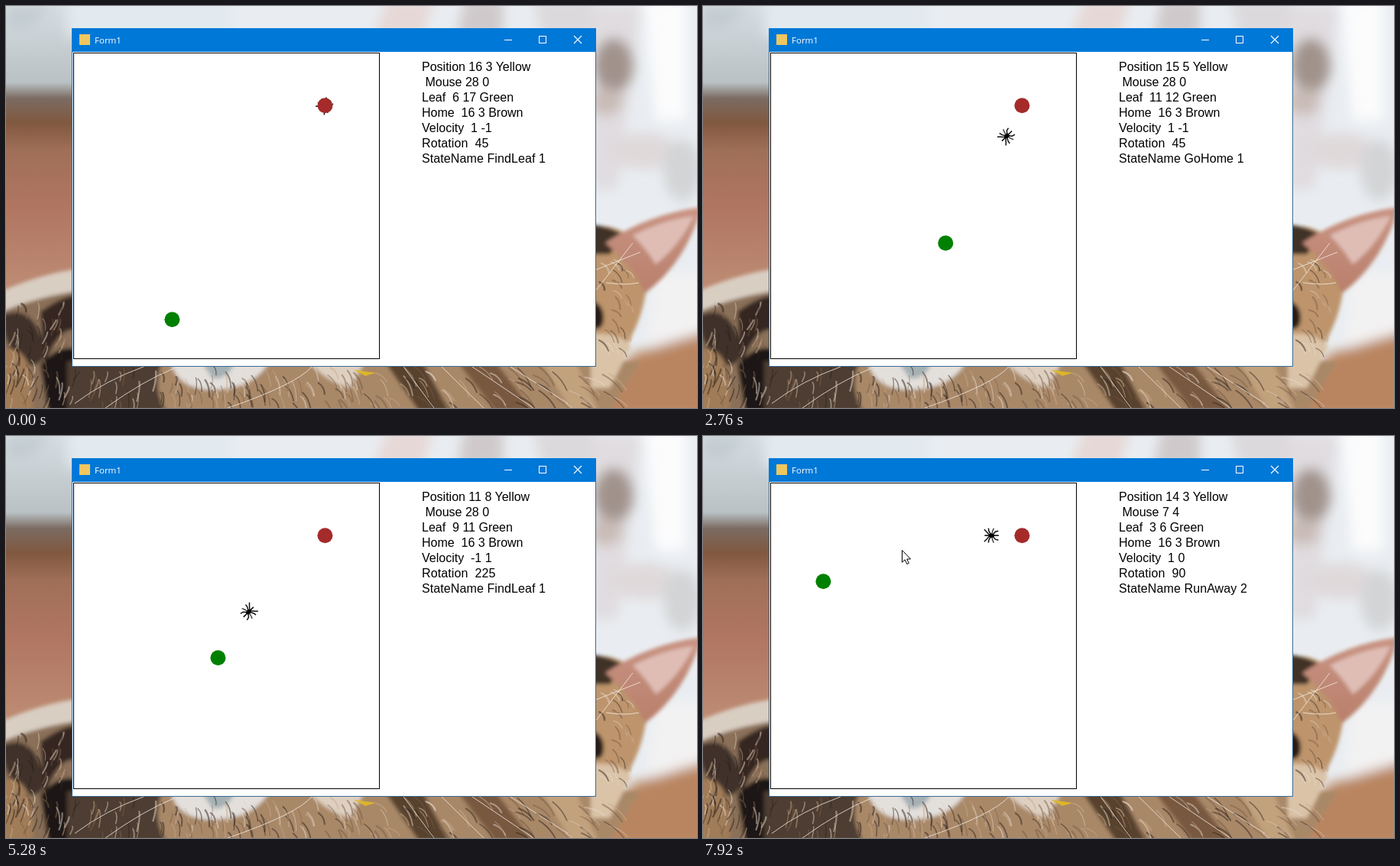
An HTML page for the animation above (8000 ms loop, 904 by 526 pixels).

```html
<!DOCTYPE html>
<html lang="en">
<head>
<meta charset="utf-8">
<title>Ant state machine</title>
<style>
html, body { margin: 0; width: 100%; height: 100%; overflow: hidden; }
svg { display: block; }
text { white-space: pre; }
#info { font: 16px "Liberation Sans", Arial, sans-serif; fill: #000; }
</style>
</head>
<body>
<svg width="904" height="526" viewBox="0 0 904 526">
  <defs>
    <filter id="soft" x="-30%" y="-30%" width="160%" height="160%"><feGaussianBlur stdDeviation="8"/></filter>
    <filter id="fine" x="-20%" y="-20%" width="140%" height="140%"><feGaussianBlur stdDeviation="2.5"/></filter>
    <linearGradient id="wall" x2="0" y2="1">
      <stop offset="0" stop-color="#d5dde1"/><stop offset=".19" stop-color="#b9c1c4"/>
      <stop offset=".23" stop-color="#7b6b62"/><stop offset=".29" stop-color="#80583f"/>
      <stop offset=".36" stop-color="#a06f58"/><stop offset=".5" stop-color="#b07661"/>
      <stop offset=".7" stop-color="#bd8b73"/>
    </linearGradient>
    <linearGradient id="ear" x2="0" y2="1">
      <stop offset="0" stop-color="#c99483"/><stop offset="1" stop-color="#b97f6b"/>
    </linearGradient>
  </defs>

  <g id="photo">
    <rect width="904" height="526" fill="#e9edf1"/>
    <rect width="100" height="526" fill="url(#wall)"/>
    <g filter="url(#soft)">
      <path d="M0 0H60L30 30H0Z" fill="#c3ccd0"/>
      <path d="M80 -10H300V40H80Z" fill="#e3eaef"/>
      <path d="M500 -10H560L545 40H480Z" fill="#e6d8d6"/>
      <path d="M600 -10H650V40H590Z" fill="#cfc9cb"/>
      <path d="M690 -10H770V40H700Z" fill="#dcd9dc"/>
      <path d="M765 0H830L800 240H765Z" fill="#e0dcdf"/>
      <path d="M835 -10H890V150H850Z" fill="#fcfcfd"/>
      <ellipse cx="795" cy="78" rx="26" ry="36" fill="#a1938c"/>
      <ellipse cx="785" cy="125" rx="22" ry="18" fill="#c9bcb7"/>
      <ellipse cx="835" cy="190" rx="45" ry="24" fill="#dfd9da"/>
      <ellipse cx="885" cy="215" rx="25" ry="40" fill="#d3d4d6"/>
      <path d="M850 350H920V445H840Z" fill="#f3f2f2"/>
      <path d="M820 455L920 425V540H740Z" fill="#b98560"/>
    </g>
    <g filter="url(#fine)">
      <path d="M-10 380Q45 350 100 345V540H-10Z" fill="#8a7058"/>
      <path d="M-10 375Q45 350 100 343V372Q40 380 -10 402Z" fill="#d9cec2"/>
      <path d="M-5 405Q30 390 45 430T30 470Q-5 450 -5 405Z" fill="#40332b"/>
      <path d="M45 400Q80 375 95 380V425Q70 415 50 470Z" fill="#342821"/>
      <path d="M-5 450Q40 440 35 530H-5Z" fill="#a07b59"/>
      <path d="M45 470Q70 440 95 450V530H55Z" fill="#1e1815"/>
      <path d="M80 465H830L790 530H80Z" fill="#a98868"/>
      <path d="M80 465H205Q190 500 210 530H80Z" fill="#4e3e33"/>
      <path d="M215 465H345Q325 500 275 502T215 465Z" fill="#e3dfdb"/>
      <path d="M255 465H300Q290 490 270 487Z" fill="#a5b0b4"/>
      <path d="M395 465H470L450 500Q420 492 395 465Z" fill="#ded0c1"/>
      <path d="M495 465H545L580 530H540Z" fill="#59422f"/>
      <path d="M590 465H640L690 530H640Z" fill="#79593f"/>
      <path d="M700 465H745L775 530H740Z" fill="#c2a17d"/>
      <path d="M765 290Q800 280 840 320Q842 380 824 420T790 485H765Z" fill="#bd946c"/>
      <path d="M765 286Q790 288 808 300L790 325H765Z" fill="#413128"/>
      <path d="M765 430Q800 425 818 445L790 500H765Z" fill="#dac3a7"/>
      <path d="M765 385Q782 390 782 408T765 422Z" fill="#291e18"/>
      <path d="M784 310Q840 272 910 263Q890 335 836 376Q820 340 784 310Z" fill="url(#ear)"/>
      <path d="M820 300Q865 278 900 275Q880 315 850 338Q838 318 820 300Z" fill="#dfbdb5"/>
    </g>
    <g id="fur" fill="none" stroke-linecap="round"></g>
    <g fill="none" stroke="#f4ece2" stroke-width="1" opacity=".8">
      <path d="M772 372L820 310M772 345L830 322M785 362Q810 366 828 362"/>
      <path d="M90 520Q130 490 180 472M130 526Q180 490 220 474M290 526Q380 495 400 472"/>
      <path d="M520 472L560 526M570 472L625 526M610 472L690 526M660 472L735 520"/>
    </g>
    <path d="M455 476L484 480L470 484Z" fill="#dcb52b"/>
  </g>

  <rect x="86" y="29" width="686" height="443" fill="#3b6b94"/>
  <rect x="87" y="60" width="684" height="411" fill="#fff"/>
  <rect x="86" y="29" width="686" height="31" fill="#0078d7"/>
  <rect x="96" y="37" width="14" height="14" fill="#efc75e"/>
  <text x="116" y="49" font-family="'Open Sans', sans-serif" font-size="11.5" fill="#fff">Form1</text>
  <g fill="none" stroke="#fff">
    <path d="M652 44.5H662"/>
    <rect x="697.5" y="39.5" width="9" height="9"/>
    <path d="M743 39L753 49M753 39L743 49" stroke-width="1.1"/>
  </g>
  <rect x="88.5" y="61.5" width="400" height="400" fill="#fff" stroke="#000"/>

  <g id="ant" fill="none" stroke="#111" stroke-width="1.5">
    <path d="M0 -9.5V9" stroke-width="1.6"/>
    <path d="M-6 -9L-5 -5L0 -1L5 -5L6 -9"/>
    <path d="M-9.5 -3L-6 -1.5L0 0L6 -1.5L9.5 -3" stroke="#444"/>
    <path d="M-9.5 4L-6 3.5L0 0L6 3.5L9.5 4"/>
    <path d="M-8 9.5L-5 6.5L0 2L5 6.5L8 9.5"/>
    <ellipse rx="2.7" ry="3.6" fill="#000" stroke="none"/>
  </g>
  <circle id="leaf" r="10" fill="#008000"/>
  <circle id="home" r="10" fill="#a52a2a"/>
  <g id="info"></g>
  <path id="cursor" d="M.5 .5V16.3L4.2 12.9L6.8 18.6L9.3 17.5L6.8 12H11.6Z" fill="#fff" stroke="#000"/>
</svg>
<script>
const $ = id => document.getElementById(id);
const NS = 'http://www.w3.org/2000/svg';
const LOOP = 8000, FRAME = 120;
const TICKS_PER_FRAME = 1.145, PHASE = 0.65;
const HOME = [16, 3];
const LEAVES = [[6, 17], [11, 12], [9, 11], [3, 6]];
const FLEE_TICK = 70;
const CURSOR_START = 55, MOUSE_LAG = 0.75;
const TRAIL = [
  [390, 286], [314, 257], [240, 204], [221, 172], [212, 153], [208, 141],
  [206, 135], [205, 131], [204, 129], [216, 133], [242, 143], [260, 149]
];

function add(parent, tag, attrs) {
  const el = document.createElementNS(NS, tag);
  for (const key in attrs) el.setAttribute(key, attrs[key]);
  return parent.appendChild(el);
}

function place(el, [x, y], turn = 0) {
  el.setAttribute('transform', `translate(${x} ${y}) rotate(${turn})`);
}

const centre = ([x, y]) => [97.4 + 20 * x, 70.2 + 20 * y];

function drawFur() {
  let seed = 11;
  const rnd = () => (seed = seed * 16807 % 2147483647) / 2147483647;
  const tones = ['#2b211c', '#c9a98a', '#e4d6c6', '#7a5b46'];
  const strand = (x, y, dx, dy) => add($('fur'), 'path', {
    d: `M${x} ${y}q${dx / 2 + 3} ${dy / 2 - 3} ${dx} ${dy}`,
    stroke: tones[Math.floor(rnd() * 4)],
    'stroke-width': 1 + rnd() * 1.5,
    opacity: 0.5
  });
  for (let i = 0; i < 190; i++) {
    const x = rnd() * 790;
    strand(x, 470 + rnd() * 50, (x - 300) / 25 + rnd() * 8, 10 + rnd() * 16);
  }
  for (let i = 0; i < 60; i++) strand(rnd() * 80, 385 + rnd() * 130, 8 - rnd() * 16, 10 + rnd() * 12);
  for (let i = 0; i < 30; i++) strand(772 + rnd() * 40, 330 + rnd() * 120, 5 + rnd() * 8, 8 + rnd() * 10);
}

// Unit direction between cells, rounded to whole steps.
function heading(from, to) {
  const dx = to[0] - from[0], dy = to[1] - from[1], d = Math.hypot(dx, dy);
  return [Math.round(dx / d), Math.round(dy / d)];
}

function simulate(ticks) {
  let pos = HOME, vel = [1, -1], state = 'FindLeaf', leaf = 0;
  for (let i = 1; i <= ticks; i++) {
    if (state === 'RunAway') vel = [1, 0];
    else vel = heading(pos, state === 'FindLeaf' ? LEAVES[leaf] : HOME);
    pos = [pos[0] + vel[0], pos[1] + vel[1]];
    const at = cell => pos[0] === cell[0] && pos[1] === cell[1];
    if (i === FLEE_TICK) state = 'RunAway';
    else if (state === 'FindLeaf' && at(LEAVES[leaf])) {
      state = 'GoHome';
      leaf++;
    } else if (state === 'GoHome' && at(HOME)) state = 'FindLeaf';
  }
  const turn = (Math.atan2(vel[0], -vel[1]) * 180 / Math.PI + 360) % 360;
  return { pos, vel, state, turn: Math.round(turn), leaf: LEAVES[leaf] };
}

// The reported cell trails slightly behind the pointer.
function mouseCell(i) {
  if (i < 1) return [28, 0];
  const a = TRAIL[i - 1], b = TRAIL[i];
  const lagged = k => b[k] + (a[k] - b[k]) * MOUSE_LAG;
  return [Math.floor((lagged(0) - 88) / 20), Math.floor((lagged(1) - 61) / 20)];
}

const lines = Array.from({ length: 7 }, (_, i) => add($('info'), 'text', {
  x: 544, y: 85 + 20 * i, 'letter-spacing': i > 4 ? 0.1 : 0
}));

function render(time) {
  const frame = Math.floor(time % LOOP / FRAME);
  const s = simulate(Math.floor(frame * TICKS_PER_FRAME + PHASE));
  const i = frame - CURSOR_START;

  place($('ant'), centre(s.pos), s.turn);
  place($('leaf'), centre(s.leaf));
  place($('home'), centre(HOME));
  $('cursor').style.display = i < 0 ? 'none' : '';
  if (i >= 0) place($('cursor'), TRAIL[i]);

  [
    `Position ${s.pos.join(' ')} Yellow`,
    ` Mouse ${mouseCell(i).join(' ')}`,
    `Leaf  ${s.leaf.join(' ')} Green`,
    `Home  ${HOME.join(' ')} Brown`,
    `Velocity  ${s.vel.join(' ')}`,
    `Rotation  ${s.turn}`,
    `StateName ${s.state} ${s.state === 'RunAway' ? 2 : 1}`
  ].forEach((str, k) => { lines[k].textContent = str; });
}

drawFur();
const start = performance.now();
function loop() {
  render(performance.now() - start);
  requestAnimationFrame(loop);
}
loop();
</script>
</body>
</html>
```
